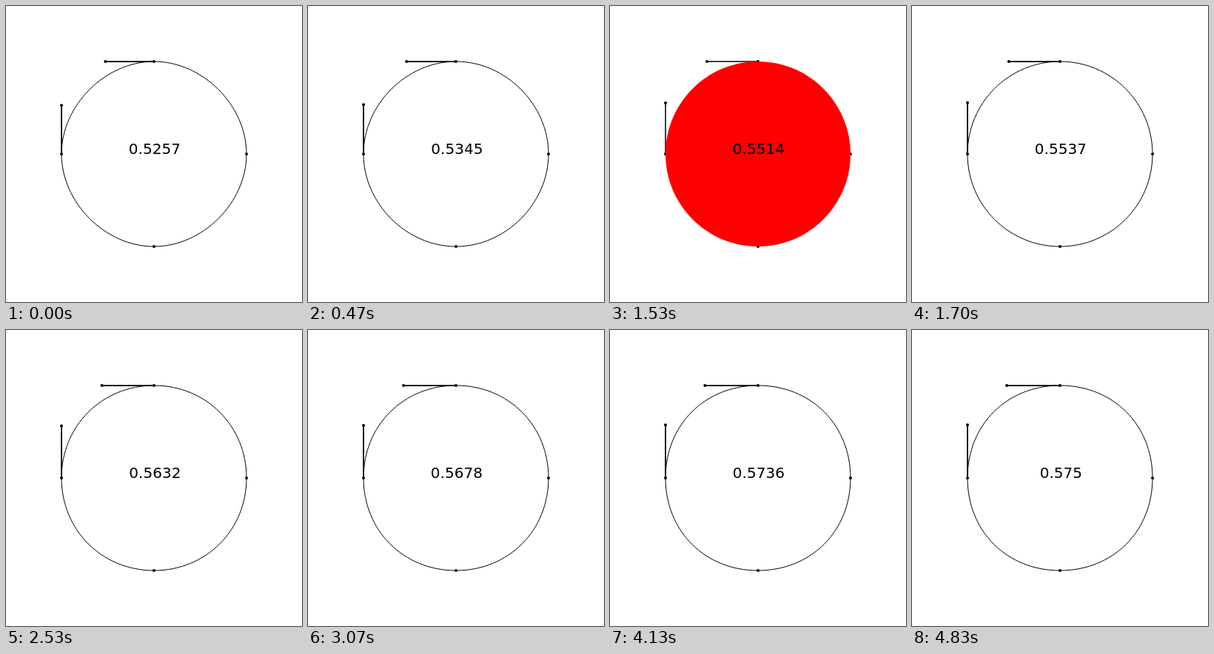
Write an HTML page with a canvas that moves like this. It is 400 by 400 pixels and loops after 5.01 s.

```html
<!DOCTYPE html>
<html lang="en">
<head>
<meta charset="utf-8">
<title>Circle from four Bézier curves</title>
<style>
  html, body { margin: 0; width: 100%; height: 100%; overflow: hidden; background: #fff; }
  canvas { display: block; width: 400px; height: 400px; }
</style>
</head>
<body>
<canvas id="stage" width="400" height="400"></canvas>
<script>
const ctx = document.getElementById('stage').getContext('2d');
const LOOP = 5010, STEPS = 150;
const C = 200, R = 125;
const FROM = 0.525, TO = 0.575;
const IDEAL = 4 / 3 * (Math.SQRT2 - 1), TOLERANCE = 0.001;

// 30 steps per second, with step times rounded to 10 ms
function stepAt(t) {
  const rest = t % 100;
  const step = 3 * Math.floor(t / 100) + (rest >= 30) + (rest >= 70);
  return Math.min(step, STEPS - 1);
}

function kappaAt(step) {
  const left = 1 - (step + 1) / STEPS;
  return TO - (TO - FROM) * left * left;
}

function dot(x, y) {
  ctx.beginPath();
  ctx.arc(x, y, 2, 0, 2 * Math.PI);
  ctx.fill();
}

function handle(x0, y0, x1, y1) {
  ctx.beginPath();
  ctx.moveTo(x0, y0);
  ctx.lineTo(x1, y1);
  ctx.stroke();
  dot(x1, y1);
}

function circlePath(k) {
  ctx.beginPath();
  ctx.moveTo(C, C - R);
  for (let i = 0; i < 4; i++) {
    const a = i * Math.PI / 2, s = Math.sin(a), c = Math.cos(a);
    const at = (x, y) => [C + R * (x * c - y * s), C + R * (x * s + y * c)];
    ctx.bezierCurveTo(...at(k, -1), ...at(1, -k), ...at(1, 0));
  }
  ctx.closePath();
}

function label(text) {
  ctx.font = '20px "DejaVu Sans", sans-serif';
  const m = ctx.measureText(text);
  const inkWidth = m.actualBoundingBoxRight + m.actualBoundingBoxLeft;
  ctx.fillText(text, C - inkWidth / 2, C);
}

function draw(step) {
  const k = kappaAt(step), filled = Math.abs(k - IDEAL) < TOLERANCE;
  ctx.fillStyle = '#fff';
  ctx.fillRect(0, 0, 400, 400);
  ctx.fillStyle = ctx.strokeStyle = '#000';

  ctx.lineWidth = filled ? 1.5 : 1.75;
  handle(C, C - R, C - R * k, C - R);
  handle(C - R, C, C - R, C - R * k);
  dot(C, C - R);
  dot(C + R, C);
  dot(C, C + R);
  dot(C - R, C);

  circlePath(k);
  if (filled) {
    ctx.fillStyle = '#f00';
    ctx.fill();
    ctx.fillStyle = '#000';
  } else {
    ctx.lineWidth = 1;
    ctx.stroke();
  }
  label(String(Number(k.toFixed(4))));
}

const start = performance.now();
function tick(now) {
  draw(stepAt(Math.max(0, now - start) % LOOP));
  requestAnimationFrame(tick);
}
draw(0);
requestAnimationFrame(tick);
</script>
</body>
</html>
```
